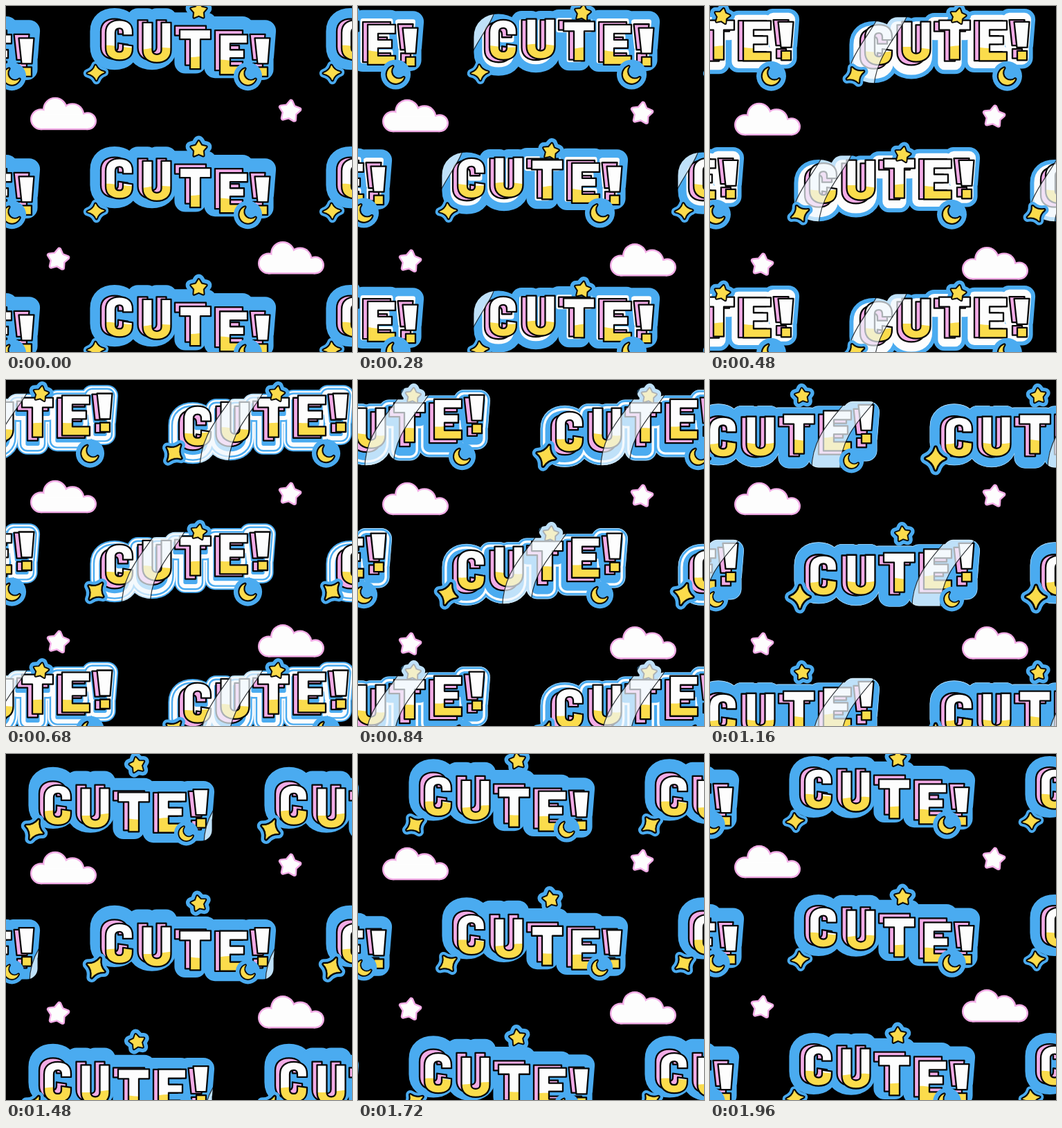
An HTML page with a canvas for the animation above (2 s loop, 500x500 px).

```html
<!DOCTYPE html>
<html lang="en">
<head>
<meta charset="utf-8">
<title>Cute stickers</title>
<style>
html, body { margin: 0; width: 500px; height: 500px; overflow: hidden; background: #000; }
canvas { display: block; }
</style>
</head>
<body>
<canvas id="stage" width="500" height="500"></canvas>
<script>
const LOOP = 2000, STEP = 40, PITCH = 341, ROW = 200, RIM = 15.6;
const BLUE = '#4aabf0', WHITE = '#fdfdfd', PINK = '#f2abe6', YELLOW = '#fbdc4c', BLACK = '#060606';
const OX = 95, OY = 170;

const stage = document.getElementById('stage').getContext('2d');
const sheet = document.createElement('canvas');
sheet.width = 320;
sheet.height = 190;
const g = sheet.getContext('2d');

// x, mean top, time of highest point, outline
const letters = [
  [144, 236, 150, 'M39 22V17C39 5 31 0 20 0C8 0 0 6 0 18V40C0 52 8 58 20 58C31 58 39 53 39 41V37L25 35V40C25 44 23 46 20 46C16 46 14 44 14 40V18C14 14 16 12 20 12C23 12 25 14 25 18V22Z'],
  [197.5, 236, 255, 'M0 0H14V40C14 44 17 46 20.5 46C24 46 27 44 27 40V0H41V40C41 52 32 58 20.5 58C9 58 0 52 0 40Z'],
  [251, 238, 430, 'M0 0H45V14H30V57H15V14H0Z'],
  [309, 238.5, 550, 'M0 0H40V13H15V22H35V34H15V45H40V58H0Z'],
  [359.5, 237, 680, 'M0 0H22L19 37H4ZM4.5 42H18.5V55.5H4.5Z']
].map(([x, y, peak, d]) => ({ x, y, peak, path: new Path2D(d) }));

const wave = (t, peak) => Math.cos((t - peak) / LOOP * Math.PI * 2);
const easeOut = p => 1 - (1 - p) * (1 - p);

function starPath(outer, inner) {
  const p = new Path2D();
  for (let i = 0; i < 10; i++) {
    const r = i % 2 ? inner : outer, a = i * Math.PI / 5 - Math.PI / 2;
    p.lineTo(r * Math.cos(a), r * Math.sin(a));
  }
  p.closePath();
  return p;
}

const starShape = starPath(11.5, 6.5);
const puffStar = starPath(14, 8);
const sparkShape = new Path2D('M12 0Q3 2.5 0 10.5Q-3 2.5 -12 0Q-3 -2.5 0 -10.5Q3 -2.5 12 0Z');
const moonShape = new Path2D();
moonShape.arc(0, 0, 12, 0.356, 4.356);
moonShape.arc(4.5, -4.5, 11, -2.482, 0.911, true);
moonShape.closePath();

function at(c, x, y, angle, size, draw) {
  c.save();
  c.translate(x, y);
  c.rotate(angle);
  c.scale(size, size);
  draw();
  c.restore();
}

function stroke(c, path, color, width) {
  c.strokeStyle = color;
  c.lineWidth = width;
  c.stroke(path);
}

function fill(c, path, color) {
  c.fillStyle = color;
  c.fill(path);
}

function eachLetter(t, dx, draw) {
  for (const l of letters) {
    at(g, l.x + dx, l.y - 17.5 * wave(t, l.peak), 0, 1, () => draw(l));
  }
}

function halo(t, color, r) {
  eachLetter(t + 200, -7, l => {
    fill(g, l.path, color);
    stroke(g, l.path, color, r * 2);
  });
}

// A white outline grows from the letters, then a blue hole opens inside it
function ripple(t, start, hole, end) {
  if (t <= start || t >= end) return;
  const grow = from => RIM * easeOut((t - from) / (end - from));
  halo(t, WHITE, grow(start));
  if (t > hole) halo(t, BLUE, grow(hole));
}

function drawFace(l, t) {
  fill(g, l.path, WHITE);
  g.save();
  g.clip(l.path);
  g.fillStyle = YELLOW;
  g.beginPath();
  g.moveTo(-2, 62);
  for (let x = -2; x <= 48; x += 2) {
    g.lineTo(x, 38 + 1.8 * Math.sin((x + l.x) / 13 + t / LOOP * Math.PI * 2));
  }
  g.lineTo(48, 62);
  g.fill();
  g.restore();
  stroke(g, l.path, BLACK, 2.3);
}

function badge(path, rim) {
  if (rim) stroke(g, path, BLUE, rim);
  stroke(g, path, BLACK, 4.6);
  fill(g, path, YELLOW);
  stroke(g, path, YELLOW, 0.6);
}

function drawGlare(t) {
  const top = 155 + 0.28 * (t - 280), foot = 208 + 0.26 * (t - 680), width = 41;
  const edge = dx => {
    g.moveTo(top + dx, 195);
    g.bezierCurveTo(top + dx - 7, 238, foot + dx, 262, foot + dx, 330);
  };
  g.save();
  g.globalCompositeOperation = 'source-atop';
  g.fillStyle = 'rgba(241,248,253,.7)';
  g.beginPath();
  edge(0);
  g.lineTo(foot - width, 330);
  g.bezierCurveTo(foot - width, 262, top - width - 7, 238, top - width, 195);
  g.fill();
  g.strokeStyle = 'rgba(10,15,20,.85)';
  g.lineWidth = 1.2;
  g.beginPath();
  edge(0);
  edge(-width);
  g.stroke();
  g.restore();
}

function drawSticker(t, bob) {
  g.setTransform(1, 0, 0, 1, 0, 0);
  g.clearRect(0, 0, sheet.width, sheet.height);
  g.translate(-OX, -OY);
  g.lineJoin = 'round';

  halo(t, BLUE, RIM);
  ripple(t, 190, 440, 950);
  ripple(t, 360, 620, 1300);
  const tilt = 0.2 * Math.sin(t / LOOP * Math.PI * 2);
  const starSize = 0.96 + 0.04 * wave(t, 0);
  at(g, 278.5, 207 + bob, tilt, starSize, () => stroke(g, starShape, BLUE, 16));
  eachLetter(t + 110, -7, l => {
    fill(g, l.path, PINK);
    stroke(g, l.path, BLACK, 2.3);
  });
  eachLetter(t, 0, l => drawFace(l, t));
  at(g, 278.5, 207 + bob, tilt, starSize, () => badge(starShape, 0));
  drawGlare(t);

  at(g, 349.5, 308 - 9 * wave(t, 250), 0, 0.94 + 0.1 * wave(t, 350), () => {
    g.fillStyle = BLUE;
    g.beginPath();
    g.arc(0, 0, 20.8, 0, Math.PI * 2);
    g.fill();
    badge(moonShape, 0);
  });
  const turn = (1 - wave(t, 130)) / 2;
  at(g, 130, 304.5 - 9 * wave(t, 150), -turn * Math.PI / 2, 1 + 0.33 * turn, () => badge(sparkShape, 12));
}

function drawCloud(x, y) {
  for (const [color, inset] of [[PINK, 0], [WHITE, 2.4]]) {
    stage.fillStyle = color;
    for (const [cx, cy, r] of [[15.5, 32, 15.5], [36, 18, 18], [61, 26, 17.5], [83, 34.5, 13]]) {
      stage.beginPath();
      stage.arc(x + cx, y + cy, r - inset, 0, Math.PI * 2);
      stage.fill();
    }
    stage.fillRect(x + 15, y + 25, 68, 22.5 - inset);
  }
}

function drawPuffStar(x, y) {
  at(stage, x, y, 0.14, 1, () => {
    stroke(stage, puffStar, PINK, 7);
    stroke(stage, puffStar, WHITE, 2.2);
    fill(stage, puffStar, WHITE);
  });
}

const track = [[0, 0], [280, 46], [680, 113], [840, 142], [1160, 195.5], [1480, 252], [2000, PITCH]];
function slide(t) {
  const i = track.findIndex(k => k[0] > t);
  const [t0, x0] = track[i - 1], [t1, x1] = track[i];
  return x0 + (x1 - x0) * (t - t0) / (t1 - t0);
}

function drawRow(x, y) {
  for (let i = -2; i <= 1; i++) {
    stage.drawImage(sheet, Math.round(x + i * PITCH) + OX, y + OY);
  }
}

function render(t) {
  const bob = 8.5 * (1 - wave(t, 0));
  stage.fillStyle = '#000';
  stage.fillRect(0, 0, 500, 500);
  stage.lineJoin = 'round';
  drawCloud(35, 131.7 + bob);
  drawCloud(364, 340 + bob);
  drawPuffStar(410, 152 + bob);
  drawPuffStar(75, 366 + bob);
  drawSticker(t, bob);
  const x = slide(t);
  drawRow(x, -ROW);
  drawRow(0, 0);
  drawRow(x, ROW);
}

const begin = performance.now();
function tick() {
  const t = (performance.now() - begin) % LOOP;
  render(Math.floor(t / STEP) * STEP);
  requestAnimationFrame(tick);
}
tick();
</script>
</body>
</html>
```
